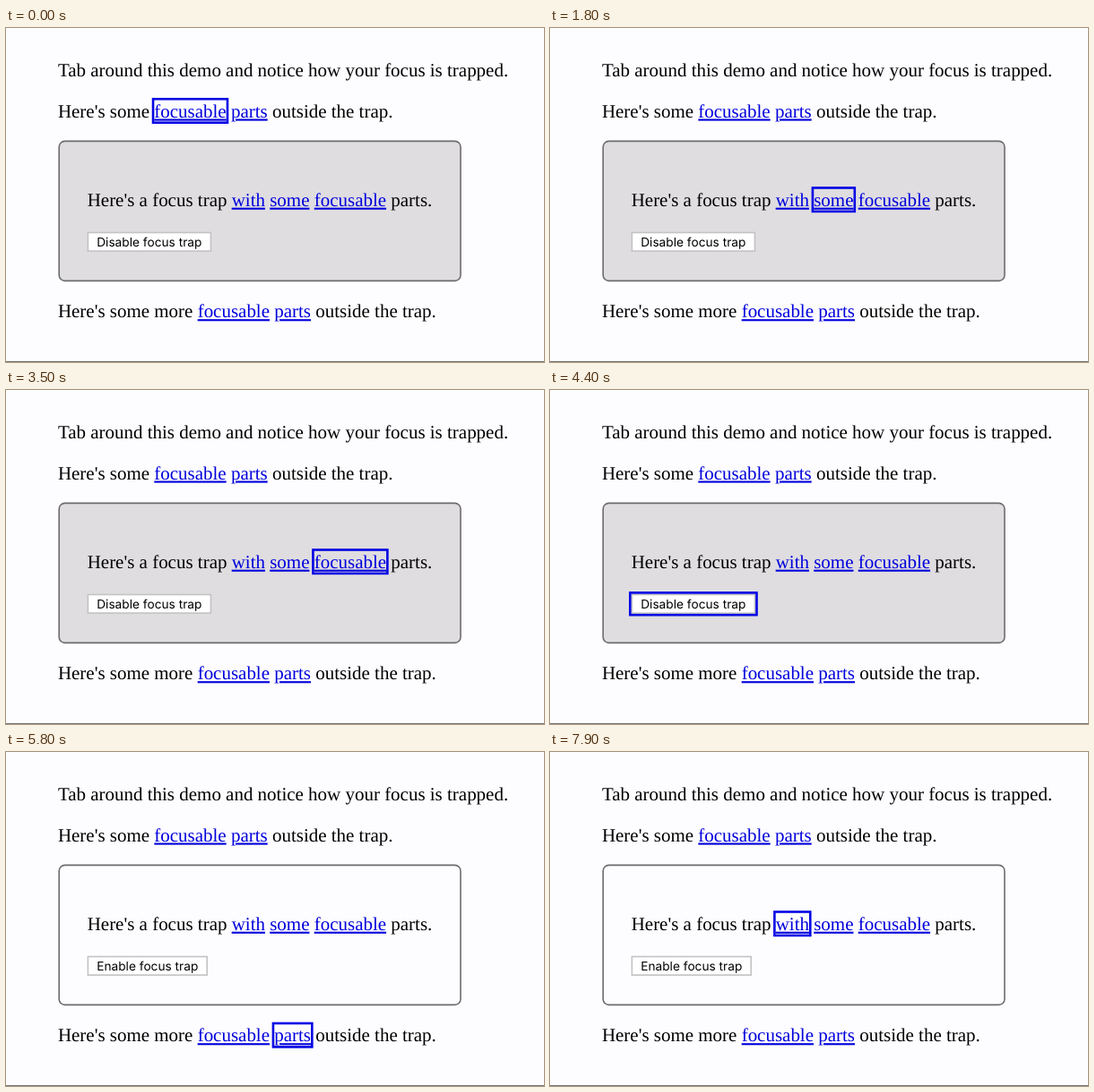
Animation of 600 by 373 pixels, one loop 8 s. Source, as an HTML page:

```html
<!DOCTYPE html>
<html lang="en">
<head>
<meta charset="utf-8">
<title>Focus trap demo</title>
<style>
  html, body { margin: 0; width: 100%; height: 100%; overflow: hidden; background: #fdfcfe; }
  svg { display: block; width: 600px; height: 373px; }
  text {
    font: 20.98px "Liberation Serif", "Times New Roman", serif;
    fill: #000;
    white-space: pre;
    text-rendering: geometricPrecision;
  }
  .link {
    fill: #0000dc;
    text-decoration: underline;
    text-decoration-thickness: 1.3px;
    text-underline-offset: 1.3px;
  }
  #label { font: 13.7px Inter, "Liberation Sans", sans-serif; }
  #trap { stroke: #6c6b6d; stroke-width: 1.6; }
  #button { fill: #fff; stroke: #c3c2c4; stroke-width: 1.6; }
  #ring { fill: none; stroke: #0404e4; stroke-width: 2.6; }
</style>
</head>
<body>
<svg viewBox="0 0 600 373">
  <rect width="600" height="373" fill="#fdfcfe"/>
  <rect y="372" width="600" height="1" fill="#777678"/>
  <rect id="trap" x="59.2" y="126.4" width="447.8" height="156" rx="6.5"/>
  <text x="57.9" y="54.2">Tab around this demo and notice how your focus is trapped.</text>
  <text x="57.9" y="99.5">Here's some <tspan class="link" id="topFirst">focusable</tspan> <tspan class="link" id="topSecond">parts</tspan> outside the trap.</text>
  <text x="90.7" y="198.7">Here's a focus trap <tspan class="link" id="with">with</tspan> <tspan class="link" id="some">some</tspan> <tspan class="link" id="inner">focusable</tspan> parts.</text>
  <rect id="button" x="91.4" y="228.5" height="20.6"/>
  <text id="label" x="101.2" y="244"></text>
  <text x="57.9" y="323.2">Here's some more <tspan class="link" id="lowFirst">focusable</tspan> <tspan class="link" id="lowSecond">parts</tspan> outside the trap.</text>
  <rect id="ring"/>
</svg>
<script>
const LOOP = 8000;
const RELEASE = 4500; // the trap is switched off here

// [start in ms, focused element]
const STEPS = [
  [0, "topFirst"], [700, "topSecond"], [1200, "with"], [1600, "some"],
  [2000, "inner"], [2300, "button"], [2600, "with"], [2900, "some"],
  [3300, "inner"], [3700, "button"], [4900, "lowFirst"], [5300, "lowSecond"],
  [5900, "lowFirst"], [6200, "button"], [7400, "inner"], [7600, "some"],
  [7800, "with"]
];

const byId = id => document.getElementById(id);
const setAttrs = (el, attrs) => {
  for (const name in attrs) el.setAttribute(name, attrs[name]);
};

function boundsOf(id, trapped) {
  if (id === "button") {
    return { x: 90.6, y: 227.7, width: trapped ? 138.6 : 134.4, height: 22.2 };
  }
  const start = byId(id).getStartPositionOfChar(0);
  const width = byId(id).getComputedTextLength();
  return { x: start.x, y: start.y - 18.9, width, height: 23.8 };
}

function render(time) {
  const trapped = time < RELEASE;
  const focused = STEPS.filter(([start]) => start <= time).pop()[1];
  const box = boundsOf(focused, trapped);

  setAttrs(byId("trap"), { fill: trapped ? "#dfdde0" : "#fdfcfe" });
  setAttrs(byId("button"), { width: trapped ? 137 : 132.8 });
  byId("label").textContent = (trapped ? "Disable" : "Enable") + " focus trap";
  setAttrs(byId("ring"), {
    x: box.x - 1.3,
    y: box.y - 1.3,
    width: box.width + 2.6,
    height: box.height + 2.6
  });
}

const origin = performance.now();
function tick() {
  render((performance.now() - origin) % LOOP);
  requestAnimationFrame(tick);
}
tick();
</script>
</body>
</html>
```
